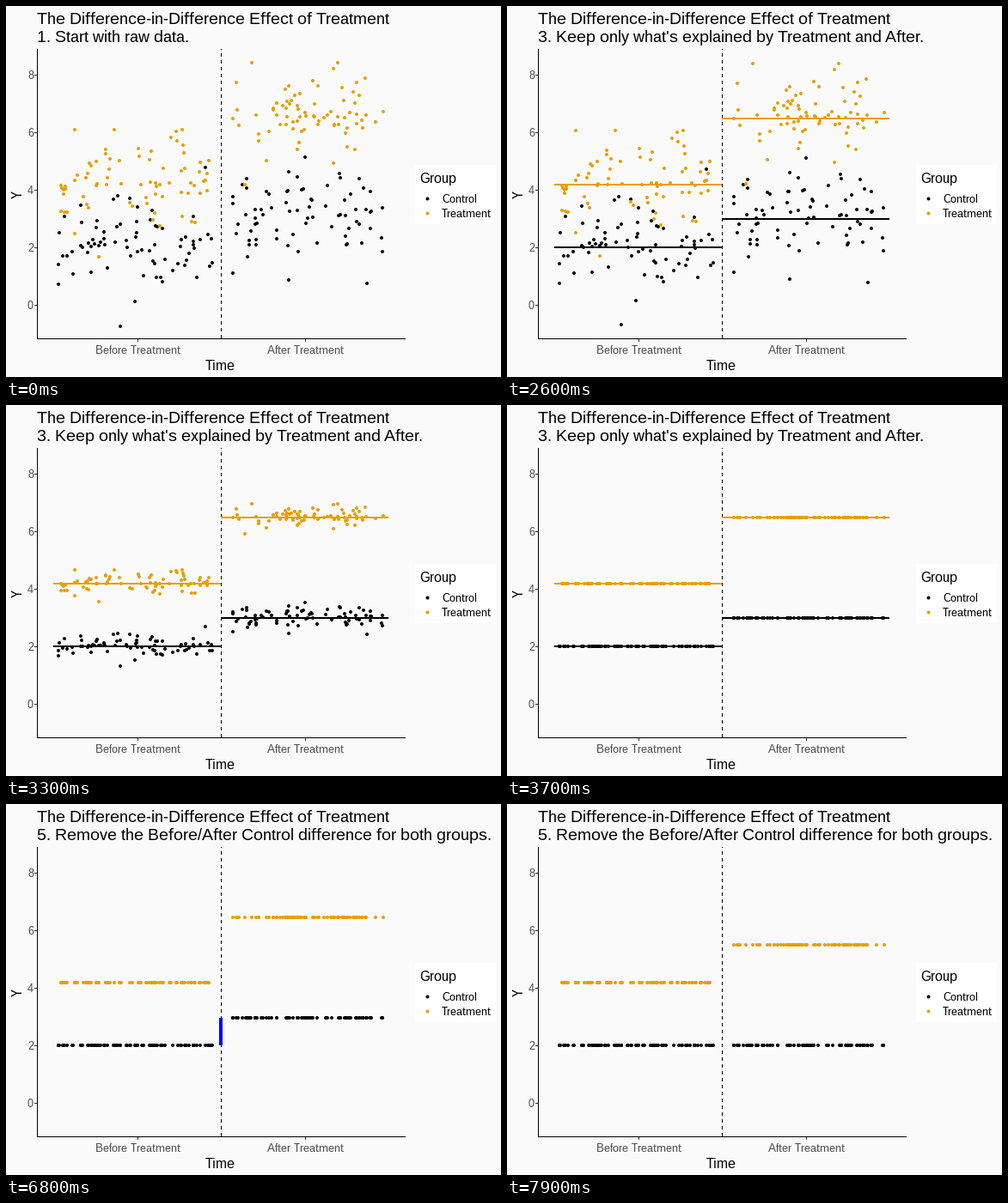
Recreate the animation shown at these times as a matplotlib script. Size 576 by 432 pixels, loop 8000 ms.

```python
import numpy as np
import matplotlib.pyplot as plt
from matplotlib.animation import FuncAnimation
from matplotlib.patches import Rectangle

W, H = 576, 432
STEP, FRAMES = 100, 80
BLACK, GOLD, GREY = "black", "#E69F00", "#4D4D4D"
TITLE, HEAD, SMALL = 19, 16, 13
MID, DROP = 250, 33
PER_CELL, SPREAD = 74, 28

# Whole-pixel glyph advances, as on a screen device
plt.rcParams.update({
    "font.family": "Liberation Sans",
    "text.hinting": "native",
    "text.hinting_factor": 1,
})
fig = plt.figure(figsize=(W / 72, H / 72), dpi=72, facecolor="#FAFAFA")
ax = fig.add_axes([0, 0, 1, 1])
ax.set(xlim=(0, W), ylim=(H, 0))
ax.axis("off")


def label(x, y, s, size, color=BLACK, **kw):
    return ax.text(x, y, s, fontsize=size, color=color, va="baseline", **kw)


def line(xs, ys, color=BLACK, lw=1, **kw):
    return ax.plot(xs, ys, color=color, lw=lw, snap=False,
                   solid_capstyle="butt", **kw)[0]


# Axes
line([36.5, 36.5], [50, 388])
line([36, 465], [387.5, 387.5])
for v in range(0, 10, 2):
    y = 348.5 - 33.5 * v
    line([33, 36], [y, y], "#333333")
    label(32, y + 4.5, str(v), SMALL, GREY, ha="right")
for x, s in ((153, "Before Treatment"), (348, "After Treatment")):
    line([x + .5, x + .5], [388, 391], "#333333")
    label(x, 405, s, SMALL, GREY, ha="center")
label(249.5, 424, "Time", HEAD, ha="center")
label(18.5, 220, "Y", HEAD, rotation=90, rotation_mode="anchor", ha="center")

# Legend
ax.add_patch(Rectangle((476, 185), 94, 69, fc="white", lw=0))
label(481, 206, "Group", HEAD)
for y, c, s in ((225, BLACK, "Control"), (242, GOLD, "Treatment")):
    ax.scatter([490], [y - 1], s=16, color=c, lw=0)
    label(507, y + 4, s, SMALL)

label(36, 21, "The Difference-in-Difference Effect of Treatment", TITLE)
caption = label(36, 42, "", TITLE)
captions = [
    (0, "1. Start with raw data."),
    (500, "2. Explain Y using Treatment and After."),
    (2600, "3. Keep only what's explained by Treatment and After."),
    (4700, "4. See how Control changed Before to After."),
    (6800, "5. Remove the Before/After Control difference for both groups."),
]

# Each cell: mean height, colour, after treatment, highest and lowest point
cells = [
    (281, BLACK, False, (232, 188), (133, 373)),
    (208, GOLD, False, (126, 144), (108, 292)),
    (248, BLACK, True, (348, 176), (420, 323)),
    (131, GOLD, True, (286, 66), (278, 208)),
]


def sample(rng, mean, after, top, low):
    x = rng.uniform(60, 241, PER_CELL) + 198 * after
    y = np.clip(rng.normal(mean, SPREAD, PER_CELL), top[1], low[1])
    return np.vstack([top, low, np.column_stack([x, y])])


rng = np.random.default_rng(7)
raw = np.vstack([sample(rng, m, *rest) for m, _, *rest in cells])
means, colors, after = (np.repeat([c[k] for c in cells], PER_CELL + 2)
                        for k in range(3))

line([MID + .5] * 2, [387, 50], ls=(0, (4, 4)))
dots = ax.scatter(raw[:, 0], raw[:, 1], s=16, c=list(colors), lw=0, zorder=3)
fits = [line([MID, 445] if late else [55, MID], [m, m], c, 2, zorder=4)
        for m, c, late, *_ in cells]
bar = line([MID, MID], [281, 248], "blue", 4, zorder=5)


def ease(t, start):
    """Sine in-out over twelve steps, the first one shown at start."""
    x = np.clip((t - start + STEP) / (12 * STEP), 0, 1)
    return (1 - np.cos(np.pi * x)) / 2


def update(i):
    t = i * STEP
    caption.set_text([s for t0, s in captions if t >= t0][-1])
    squeeze, drop = ease(t, 2600), DROP * ease(t, 6800)
    y = raw[:, 1] + (means - raw[:, 1]) * squeeze + after * drop
    dots.set_offsets(np.round(np.column_stack([raw[:, 0], y])))
    for f in fits:
        f.set_visible(900 <= t < 4700)
    bar.set_ydata([281, 248 + round(drop)])
    bar.set_visible(5100 <= t < 7900)
    return [caption, dots, bar, *fits]


anim = FuncAnimation(fig, update, frames=FRAMES, interval=STEP,
                     repeat=True, repeat_delay=0, blit=False)
plt.show()
```
